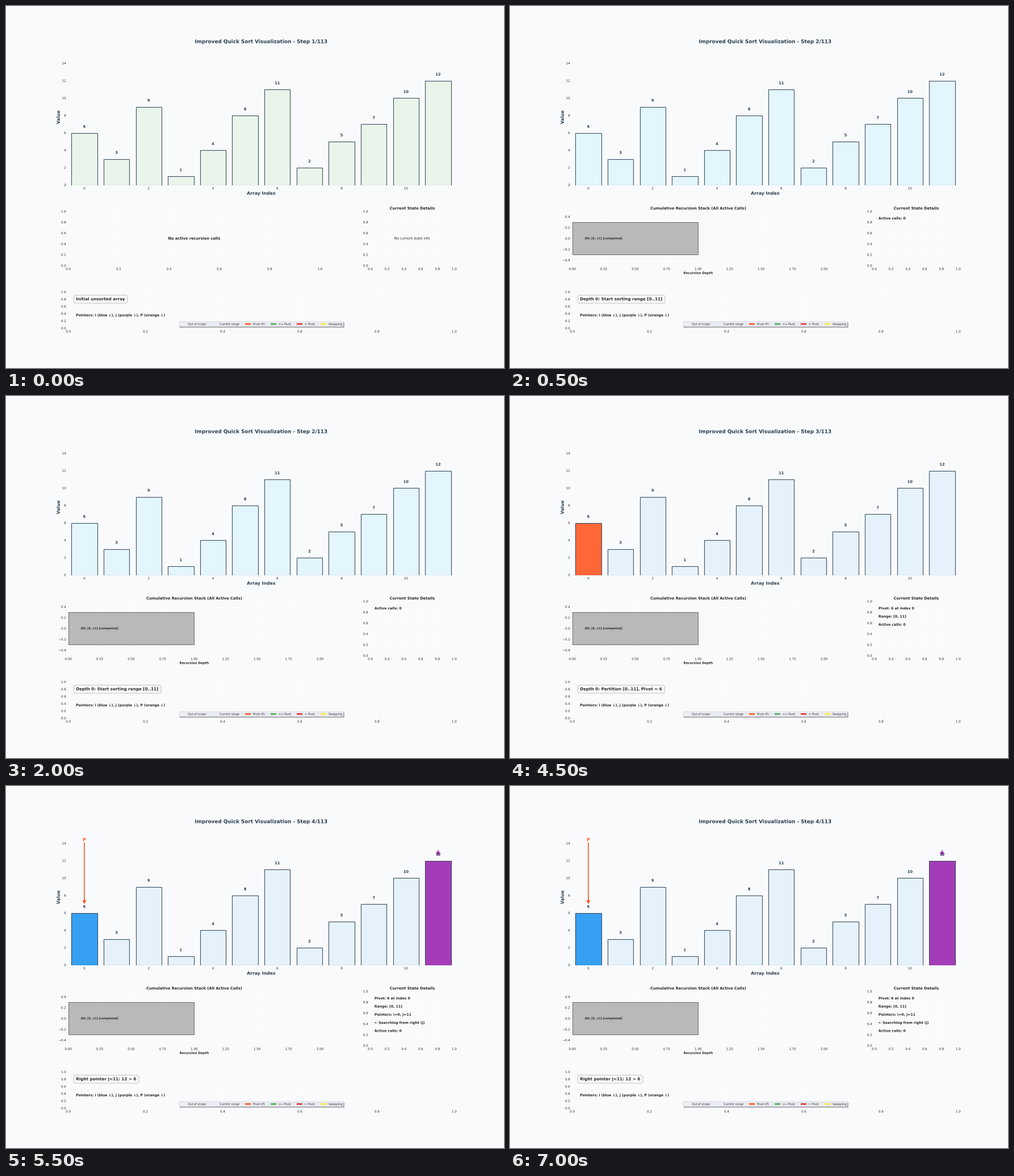
Write a matplotlib script that moves like this. It is 877 by 638 pixels and loops after 8000 ms.

```python
import matplotlib.pyplot as plt
from matplotlib.animation import FuncAnimation
from matplotlib.patches import Patch
from matplotlib.patheffects import Normal
from matplotlib.text import Text

WIDTH, HEIGHT, DPI = 877, 638, 39.875
BG, INK, NAVY = "#F8FAFC", "#262626", "#2C3E50"
ORANGE, BLUE, PURPLE = "#FF5722", "#2196F3", "#9C27B0"
RANGE = "#E3F2FD"

VALUES = [6, 3, 9, 1, 4, 8, 11, 2, 5, 7, 10, 12]
LAST = len(VALUES) - 1
TOP = max(VALUES)

LEGEND = {
    "Out of scope": "#F5F5F5",
    "Current range": RANGE,
    "Pivot (P)": ORANGE,
    "<= Pivot": "#4CAF50",
    "> Pivot": "#E53935",
    "Swapping": "#FFEB3B",
}

# Each step: base bar colour, highlighted bars, message, state lines, pointers
STEPS = [
    dict(base="#E8F5E8", marks={}, message="Initial unsorted array",
         state=None, pointers=False),
    dict(base="#E1F5FE", marks={},
         message=f"Depth 0: Start sorting range [0..{LAST}]",
         state=["Active calls: 0"], pointers=False),
    dict(base=RANGE, marks={0: ORANGE},
         message=f"Depth 0: Partition [0..{LAST}], Pivot = {VALUES[0]}",
         state=["Pivot: 6 at index 0", "Range: [0, 11]", "Active calls: 0"],
         pointers=False),
    dict(base=RANGE, marks={0: BLUE, LAST: PURPLE},
         message=f"Right pointer j={LAST}: {VALUES[LAST]} > {VALUES[0]}",
         state=["Pivot: 6 at index 0", "Range: [0, 11]", "Pointers: i=0, j=11",
                "← Searching from right (j)", "Active calls: 0"],
         pointers=True),
]

plt.rcParams.update({
    "font.family": "DejaVu Sans",
    "text.hinting": "none",
    "text.color": INK,
    "figure.facecolor": BG,
    "axes.facecolor": BG,
    "axes.edgecolor": "white",
    "axes.linewidth": 0,
    "axes.labelcolor": INK,
    "axes.axisbelow": True,
    "axes.grid": True,
    "grid.color": "white",
    "grid.linewidth": 1,
    "patch.linewidth": 0.8,
})
for axis in ("xtick", "ytick"):
    plt.rcParams.update({f"{axis}.color": INK, f"{axis}.labelsize": 10,
                         f"{axis}.major.size": 0, f"{axis}.major.pad": 7})

# The tiny margin keeps the pixel size from rounding down
fig = plt.figure(figsize=((WIDTH + 1e-6) / DPI, (HEIGHT + 1e-6) / DPI), dpi=DPI)
grid = fig.add_gridspec(3, 2, height_ratios=[3, 1.2, 0.8], width_ratios=[3, 1],
                        hspace=0.35, wspace=0.3)
bars_ax = fig.add_subplot(grid[0, :])
stack_ax = fig.add_subplot(grid[1, 0])
state_ax = fig.add_subplot(grid[1, 1])
info_ax = fig.add_subplot(grid[2, :])


def bold(ax, x, y, text, size, **kw):
    return ax.text(x, y, text, fontsize=size, fontweight="bold", **kw)


def draw_arrow(x, start, tip, color):
    bars_ax.annotate("", xy=(x, tip), xytext=(x, start), zorder=6,
                     arrowprops=dict(arrowstyle="-|>", color=color, lw=3,
                                     mutation_scale=20, shrinkA=0, shrinkB=0))


def draw_pointers():
    center = dict(ha="center", va="center", zorder=6)
    bold(bars_ax, 0, TOP * 1.2, "P", 14, color=ORANGE, **center)
    draw_arrow(0, 14.08, VALUES[0] + 1, ORANGE)
    bold(bars_ax, LAST, TOP + 1, "j", 14, color=PURPLE, **center)
    draw_arrow(LAST, TOP + 1.1, TOP + 0.55, PURPLE)


def draw_bars(number, step):
    ax = bars_ax
    ax.grid(False)
    colors = [step["marks"].get(i, step["base"]) for i in range(len(VALUES))]
    ax.bar(range(len(VALUES)), VALUES, width=0.8, color=colors,
           edgecolor=NAVY, linewidth=2, alpha=0.9)
    for i, value in enumerate(VALUES):
        bold(ax, i, value + 0.5, str(value), 12, color=NAVY,
             ha="center", va="bottom")
    ax.set_xlim(-0.5, LAST + 0.5)
    ax.set_ylim(0, TOP * 1.3)
    label = dict(fontweight="bold", color=NAVY)
    ax.set_title(f"Improved Quick Sort Visualization - Step {number + 1}/113",
                 fontsize=16, pad=20, **label)
    ax.set_xlabel("Array Index", fontsize=14, **label)
    ax.set_ylabel("Value", fontsize=14, **label)
    if step["pointers"]:
        draw_pointers()


def draw_stack(active):
    ax = stack_ax
    if not active:
        bold(ax, 0.5, 0.5, "No active recursion calls", 12,
             ha="center", va="center")
        return
    ax.barh(0, 1, height=0.6, color="#9E9E9E", edgecolor="black",
            linewidth=1.3, alpha=0.7)
    bold(ax, 0.1, 0, f"D0: [0..{LAST}] [completed]", 9, va="center")
    ax.set_xlim(0, 2)
    ax.set_ylim(-0.5, 0.5)
    ax.set_title("Cumulative Recursion Stack (All Active Calls)",
                 fontsize=12, fontweight="bold")
    ax.set_xlabel("Recursion Depth", fontsize=10, fontweight="bold")


def draw_state(lines):
    ax = state_ax
    ax.set_title("Current State Details", fontsize=12, fontweight="bold")
    if lines is None:
        ax.text(0.5, 0.5, "No current state info", fontsize=11,
                ha="center", va="center")
        return
    for row, line in enumerate(lines):
        bold(ax, 0.05, 0.9 - 0.15 * row, line, 11, va="top")


def draw_info(message):
    ax = info_ax
    bold(ax, 0.02, 0.8, message, 13, va="center",
         bbox=dict(boxstyle="round,pad=0.5", facecolor="white",
                   edgecolor="gray", linewidth=1, alpha=0.9))
    bold(ax, 0.02, 0.4, "Pointers: i (blue ↓), j (purple ↓), P (orange ↓)", 11,
         va="top")
    handles = [Patch(facecolor=c, alpha=0.9, label=name)
               for name, c in LEGEND.items()]
    ax.legend(handles=handles, loc="lower center", ncol=6, fontsize=9,
              frameon=True, fancybox=True, shadow=True, facecolor="#EAEAF2")


def draw(frame):
    # The first step lasts one tick, every later one five
    number = (frame + 4) // 5
    step = STEPS[number]
    for ax in fig.axes:
        ax.clear()
    draw_bars(number, step)
    draw_stack(step["state"] is not None)
    draw_state(step["state"])
    draw_info(step["message"])
    # Drawing glyphs as paths keeps small text at subpixel positions
    for text in fig.findobj(Text):
        text.set_path_effects([Normal()])
    return []


anim = FuncAnimation(fig, draw, frames=16, interval=500, repeat=True,
                     repeat_delay=0, init_func=lambda: draw(0), blit=False)
plt.show()
```
